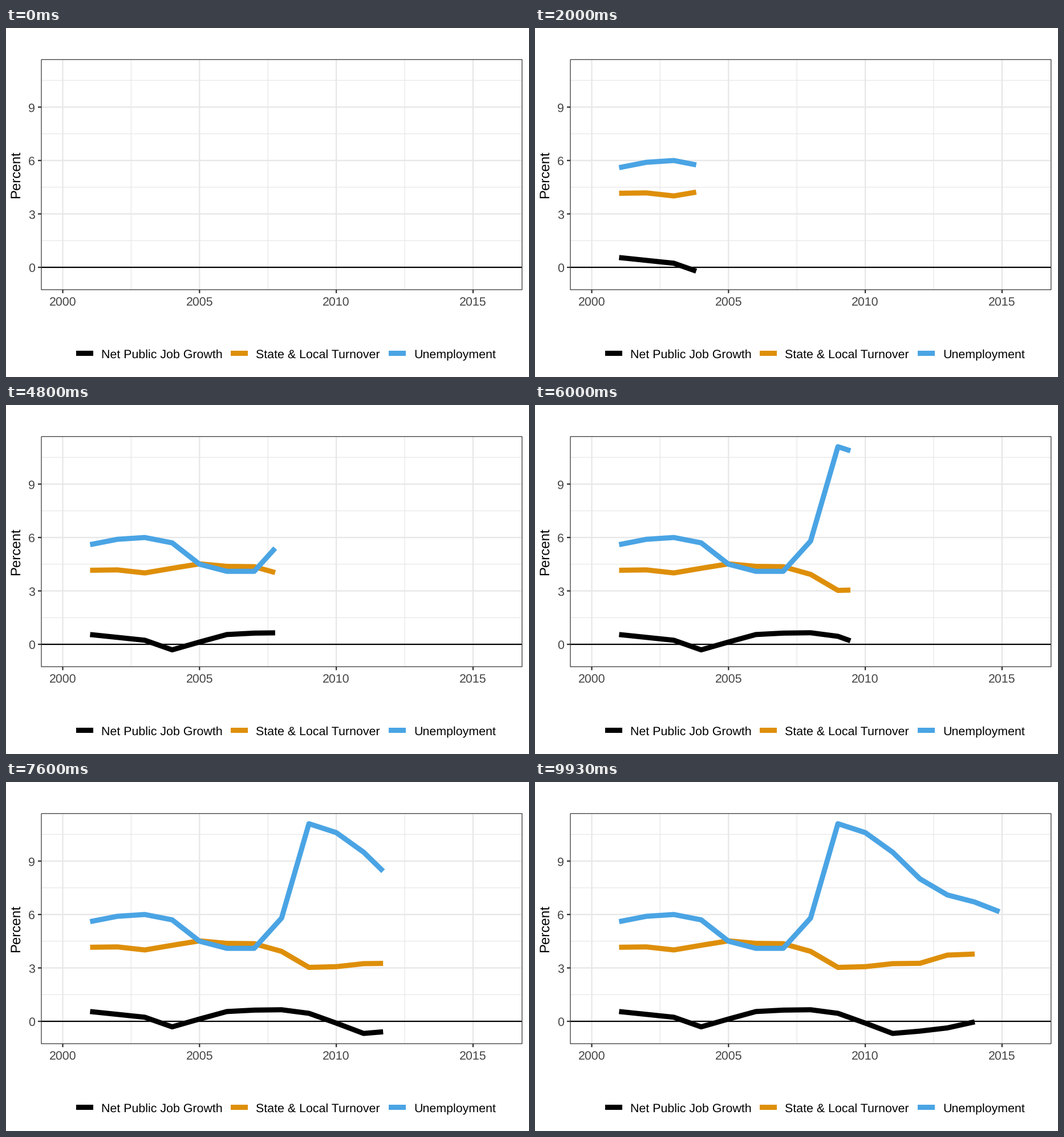
These frames come from a looping animation (917x611 px, 10000 ms). A matplotlib script:

```python
import numpy as np
import matplotlib.pyplot as plt
from matplotlib.animation import FuncAnimation

W, H, DPI = 917, 611, 64
PT = 72 / DPI  # points per pixel
FRAMES, LOOP_MS = 150, 10000

LEFT, RIGHT, TOP, BOTTOM = 62, 904.8, 55.3, 458.2
GRID, EDGE, TICK_TEXT = "#e7e7e7", "#333333", "#444444"
TEXT_PX, TITLE_PX, LINE_PX = 21.33, 24, 9

START, END = 2001, 2015
SERIES = [
    ("Net Public Job Growth", "#000000", 123,
     [0.55, 0.39, 0.23, -0.31, 0.13, 0.55, 0.63, 0.65,
      0.45, -0.10, -0.68, -0.55, -0.37, -0.03]),
    ("State & Local Turnover", "#de8f0a", 394,
     [4.16, 4.18, 4.01, 4.27, 4.52, 4.38, 4.36, 3.93,
      3.03, 3.07, 3.24, 3.26, 3.72, 3.78]),
    ("Unemployment", "#4aa4e4", 671,
     [5.6, 5.9, 6.0, 5.7, 4.5, 4.1, 4.1, 5.8,
      11.1, 10.6, 9.5, 8.0, 7.1, 6.7, 6.1]),
]

plt.rcParams["font.family"] = "Liberation Sans"
plt.rcParams["text.hinting"] = "none"

fig = plt.figure(figsize=(W / DPI, H / DPI), dpi=DPI, facecolor="white")
ax = fig.add_axes([0, 0, 1, 1])
ax.set_xlim(0, W)
ax.set_ylim(H, 0)
ax.axis("off")


def px(year):
    return 99.5 + (np.asarray(year) - 2000) * 47.96


def py(percent):
    return 419 - np.asarray(percent) * 31.17


def stroke(xs, ys, color, width, z):
    line, = ax.plot(xs, ys, color=color, lw=width * PT, zorder=z, snap=False,
                    solid_capstyle="butt", solid_joinstyle="round")
    return line


def label(x, y, text, size=TEXT_PX, color="black", **kw):
    ax.text(x, y, text, fontsize=size * PT, color=color, **kw)


def draw_grid():
    for year in (2002.5, 2007.5, 2012.5):
        stroke([px(year)] * 2, [TOP, BOTTOM], GRID, 1.2, 1)
    for value in (1.5, 4.5, 7.5, 10.5):
        stroke([LEFT, RIGHT], [py(value)] * 2, GRID, 1.2, 1)
    for value in (0, 3, 6, 9):
        y = py(value)
        stroke([LEFT, RIGHT], [y, y], GRID, 2.3, 2)
        stroke([LEFT - 6, LEFT], [y, y], EDGE, 2.3, 2)
        label(51, y + 8, str(value), color=TICK_TEXT, ha="right")
    for year in (2000, 2005, 2010, 2015):
        x = px(year)
        stroke([x, x], [TOP, BOTTOM], GRID, 2.3, 2)
        stroke([x, x], [BOTTOM, BOTTOM + 6], EDGE, 2.3, 2)
        label(x, 485.5, str(year), color=TICK_TEXT, ha="center")


def draw_frame():
    stroke([LEFT, RIGHT], [py(0)] * 2, "black", 2.2, 3)
    stroke([LEFT, RIGHT, RIGHT, LEFT, LEFT],
           [TOP, TOP, BOTTOM, BOTTOM, TOP], EDGE, 1.25, 8)
    label(28.3, 256.8, "Percent", TITLE_PX, rotation=90,
          ha="right", va="center", rotation_mode="default")


def draw_legend():
    for name, color, x, _ in SERIES:
        stroke([x, x + 30], [569.5] * 2, color, LINE_PX, 4)
        label(x + 44.3, 577.6, name)


draw_grid()
draw_frame()
draw_legend()
lines = [stroke([], [], s[1], LINE_PX, 5) for s in SERIES]


def update(frame):
    now = START + (END - START) * frame / (FRAMES - 1)
    for line, (_, _, _, values) in zip(lines, SERIES):
        years = START + np.arange(len(values))
        tip = min(now, years[-1])
        shown = np.append(years[years < tip], tip)
        if frame == 0:
            shown = shown[:0]
        line.set_data(px(shown), py(np.interp(shown, years, values)))
    return lines


anim = FuncAnimation(fig, update, frames=FRAMES, interval=LOOP_MS / FRAMES,
                     repeat=True, repeat_delay=0, blit=False)
plt.show()
```
